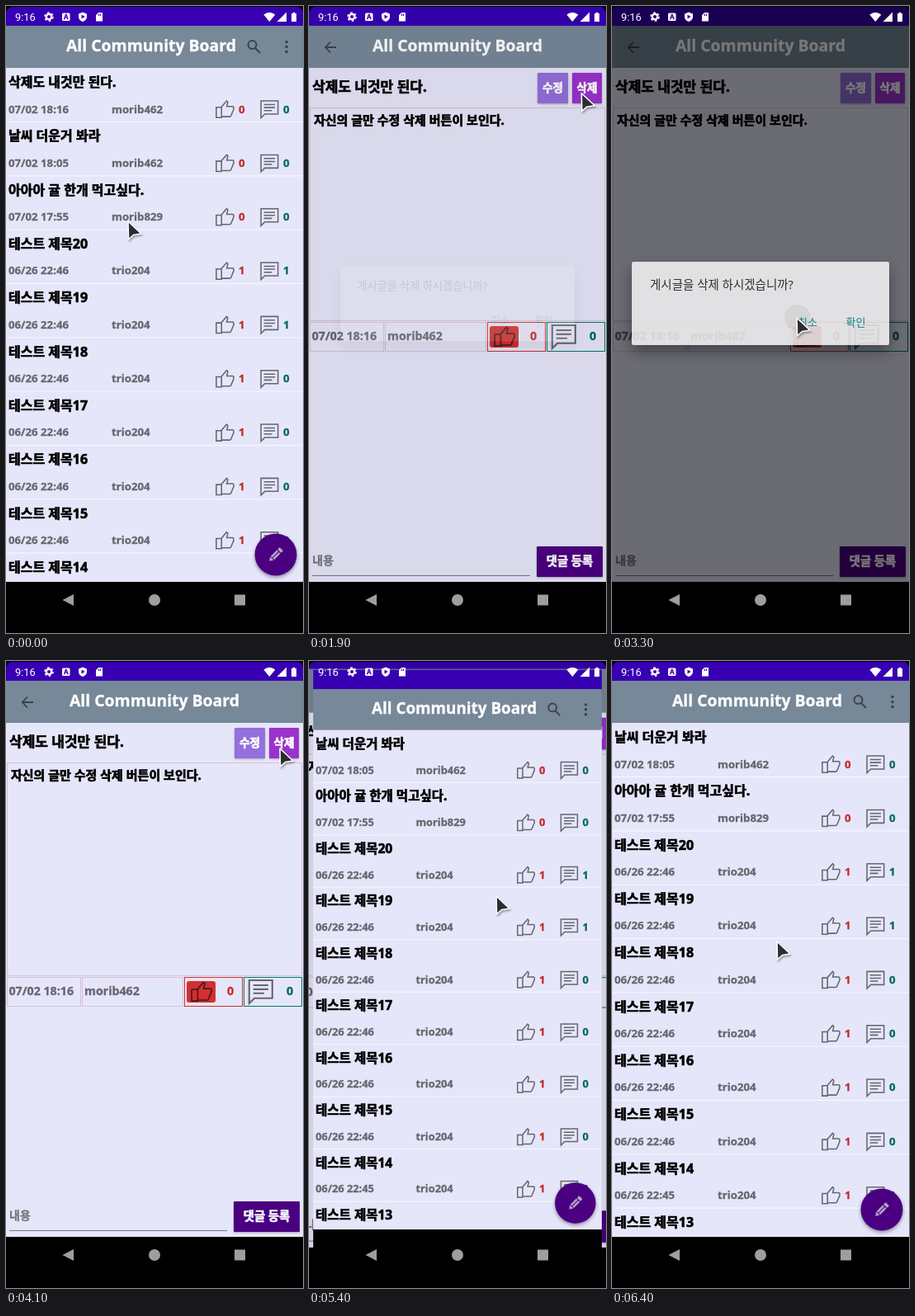
An HTML page for the animation above (6600 ms loop, 360 px wide and 760 px high).

```html
<!DOCTYPE html>
<html lang="ko">
<head>
<meta charset="utf-8">
<style>
  html, body { margin: 0; width: 100%; height: 100%; overflow: hidden; background: #000; }
  svg { display: block; width: 360px; height: 760px; clip-path: inset(1px 0 0 round 8px 8px 0 0); }
  text { font-family: 'Noto Sans', 'Noto Sans CJK KR', sans-serif; font-weight: 700; white-space: pre; stroke-width: .3; }
  .black { font-weight: 900; stroke-width: .65; }
  .plain { font-weight: 400; stroke-width: 0; }
  .mid { text-anchor: middle; }
  .icon { fill: none; stroke: #66666f; stroke-width: 1.5; }
  .raised { filter: drop-shadow(0 1px 1px #0004); }
  .fab { filter: drop-shadow(0 2px 2px #0006); }
  .card { filter: drop-shadow(0 8px 9px #0007); }
  #cursor { filter: drop-shadow(1px 2px 1px #0005); }
</style>
</head>
<body>
<svg viewBox="0 0 360 760" id="stage"></svg>
<script>
const rect = (x, y, w, h, fill, more = '') =>
  `<rect x="${x}" y="${y}" width="${w}" height="${h}" fill="${fill}" ${more}/>`;
const frame = (x, y, w, h, color) => rect(x + .5, y + .5, w - 1, h - 1, 'none', `stroke="${color}"`);
const text = (x, y, size, fill, str, cls = '') =>
  `<text x="${x}" y="${y}" font-size="${size}" fill="${fill}" stroke="${fill}" class="${cls}">${str}</text>`;
const icon = (d, x, y, k, more = '') =>
  `<path class="icon" d="${d}" transform="translate(${x} ${y}) scale(${k})" ${more}/>`;

const THUMB = 'M8 9.5L14 2.5L15.4 3.8L14.2 9H21Q22.3 9 22.3 10.3V12.3L19.3 19.6Q18.8 21 17.5 21H8zM8 10H1.8V22H8z';
const NOTE = 'M2 22.5V2.5H22V18H6.5zM5.5 6.8H18.5M5.5 10.3H18.5M5.5 13.8H15';
const RED = '#c62828', TEAL = '#00695c', GRAY = '#66666f', BG = '#e6e6fa';

// Posts, newest first
const posts = [
  ['삭제도 내것만 된다.', '07/02 18:16', 'morib462', 0, 0],
  ['날씨 더운거 봐라', '07/02 18:05', 'morib462', 0, 0],
  ['아아아 귤 한개 먹고싶다.', '07/02 17:55', 'morib829', 0, 0]
];
for (let n = 20; n > 12; n--)
  posts.push(['테스트 제목' + n, '06/26 22:4' + (n > 14 ? 6 : 5), 'trio204', 1, n > 18 ? 1 : 0]);

const screen = (titleX, body) =>
  rect(0, 74, 360, 625, BG) + body +
  rect(0, 0, 360, 25, '#3700b3') + rect(0, 24, 360, 51, '#778899') +
  text(titleX, 55, 19.4, '#fff', 'All Community Board', 'mid') +
  rect(0, 698, 360, 62, '#000');

const row = ([title, date, author, likes, notes], i) =>
  `<g transform="translate(0 ${75 + i * 65.33})">` +
  text(3, 23, 16, '#000', title, 'black') +
  text(3, 54.5, 13.2, GRAY, date) + text(128, 54.5, 13.2, GRAY, author) +
  icon(THUMB, 253, 37.5, 1.03) + text(282, 54.5, 13.2, RED, likes) +
  icon(NOTE, 307, 37.5, 1.03) + text(336, 54.5, 13.2, TEAL, notes) +
  rect(0, 65, 360, 1, '#f8f8ff') + '</g>';

const listScreen = items =>
  screen(176, items.slice(0, 10).map(row).join('')) +
  '<g fill="none" stroke="#3c4248" stroke-width="2"><circle cx="298.5" cy="47" r="5"/><path d="M302 51L308 57"/></g>' +
  [43.5, 49.5, 55.5].map(y => `<circle cx="340" cy="${y}" r="1.8" fill="#3c4248"/>`).join('') +
  '<circle class="fab" cx="327" cy="665" r="25.5" fill="#4b0082"/>' +
  '<g transform="translate(327 665) rotate(-45) scale(.95)" fill="#b5a3c6">' +
  '<path d="M-11.5 0L-7 -3.2V3.2z"/>' + rect(-6, -3.2, 11, 2.7, '#b5a3c6') +
  rect(-6, .5, 11, 2.7, '#b5a3c6') + rect(6.2, -3.2, 4, 6.4, '#b5a3c6', 'rx="1"') + '</g>';

const button = (x, y, w, color, label, size) =>
  rect(x, y, w, 37, color, 'class="raised" rx="1"') +
  text(x + w / 2, y + 22.7, size, '#fff', label, 'mid black');

const detailScreen = ([title, date, author, likes, notes]) =>
  screen(180,
    text(4, 104, 17, '#000', title, 'black') +
    button(277, 81, 37, '#9370db', '수정', 13.6) + button(319, 81, 36, '#9932cc', '삭제', 13.6) +
    frame(1, 123, 358, 259, '#d8bfd8') +
    text(6, 144, 15, '#000', '자신의 글만 수정 삭제 버튼이 보인다.', 'black') +
    frame(1, 383, 90, 36, '#d8bfd8') + frame(92, 383, 123, 36, '#d8bfd8') +
    text(3.5, 405, 14.2, GRAY, date) + text(95, 405, 14.2, GRAY, author) +
    frame(216, 383, 71, 36, '#d32f2f') + frame(288, 383, 71, 36, '#00796b') +
    rect(219, 388, 35, 26, '#d32f2f', 'rx="3"') +
    icon(THUMB, 223, 386.5, 1.17, 'style="stroke:#4a1c20"') + text(268, 405, 14.2, RED, likes) +
    icon(NOTE, 292, 383.5, 1.4) + text(340, 405, 14.2, TEAL, notes) +
    text(4, 677, 14, '#77777f', '내용') + rect(4, 690, 264, 1, '#77777f') +
    button(276, 655, 80, '#4b0082', '댓글 등록', 14.3)) +
  '<path d="M33 50H20M26 43.5L19.8 50L26 56.5" fill="none" stroke="#3c4248" stroke-width="1.8"/>';

const dialog =
  rect(24, 310, 312, 101, '#fff', 'rx="2" class="card"') +
  '<circle id="ripple" fill="#000"/>' +
  text(46, 342.5, 14.5, '#222', '게시글을 삭제 하시겠습니까?', 'plain') +
  text(225, 388, 13, '#018786', '취소', 'plain') + text(283.5, 388, 13, '#018786', '확인', 'plain');

const system =
  text(11, 18, 12.8, '#fff', '9:16', 'plain" style="font-family:Roboto,sans-serif') +
  '<g fill="none" stroke="#fff"><circle cx="52" cy="13" r="3.2" stroke-width="2.4"/>' +
  '<circle cx="52" cy="13" r="4.9" stroke-width="1.8" stroke-dasharray="2.6 2.53"/></g>' +
  rect(68, 8.5, 9.5, 9.5, '#fff', 'rx="1.5"') + text(72.7, 16.2, 8, '#3700b3', 'A', 'mid') +
  '<path fill="#fff" d="M93 7.5L98 9.5V13Q98 17 93 19Q88 17 88 13V9.5z"/>' +
  '<path fill="#3700b3" d="M91.5 10.5L95.7 13L91.5 15.5z"/>' +
  '<path fill="#fff" d="M112 8H117V18.5H109V11z"/>' +
  '<path stroke="#3700b3" d="M112.5 9.5V12M114.5 9.5V12"/>' +
  '<path fill="#fff" d="M312.3 10.5Q319.3 5 326.3 10.5L319.3 19zM328.5 19L340 7.5V19zM346 9H347.7V7.7H350.3V9H352V19H346z"/>' +
  '<g fill="#9e9e9e"><path d="M68.5 720L82 713V727z"/><circle cx="180" cy="720" r="7"/>' +
  rect(277, 713.5, 13, 13, '#9e9e9e') + '</g>';

const layer = (id, body) => `<g id="${id}">${body}</g>`;
const stage = document.getElementById('stage');
stage.innerHTML =
  layer('list', listScreen(posts)) + layer('detail', detailScreen(posts[0])) +
  rect(0, 0, 360, 698, '#000', 'id="dim"') + layer('dialog', dialog) +
  layer('shortList', listScreen(posts.slice(1))) + layer('system', system) +
  '<path id="cursor" d="M0 0L.5 22L6.5 16.5L16 15z" fill="#2c2c34" stroke="#fff" stroke-width="1.6" stroke-linejoin="round"/>';
const el = {};
stage.querySelectorAll('[id]').forEach(e => el[e.id] = e);

const clamp = v => Math.min(1, Math.max(0, v));
const ramp = (t, start, span) => clamp((t - start) / span);
const bezier = ([a, b, c, d], u) => {
  const v = 1 - u;
  return a * v * v * v + 3 * b * u * v * v + 3 * c * u * u * v + d * u * u * u;
};

// Fast start with a very long tail, in two joined curves
function ease(p) {
  const [xs, ys] = p < 1 / 6
    ? [[0, .05, .1333, 1 / 6], [0, 0, .06, .4]]
    : [[1 / 6, .2083, .25, 1], [.4, .82, 1, 1]];
  let lo = 0, hi = 1;
  for (let i = 0; i < 20; i++) {
    const mid = (lo + hi) / 2;
    if (bezier(xs, mid) < p) lo = mid; else hi = mid;
  }
  return bezier(ys, lo);
}

function place(e, opacity, scale = 1, cy = 380) {
  e.setAttribute('opacity', opacity);
  e.setAttribute('transform', `translate(180 ${cy}) scale(${scale}) translate(-180 ${-cy})`);
}

function swap(t, start, under, over) {
  const p = ramp(t, start, 400), e = ease(p);
  place(under, p < 1 ? 1 - .1 * e : 0, 1 + .05 * e);
  place(over, ramp(t, start + 35, 50), .85 + .15 * e);
}

// Dialog showings: appear, leave, click time and place
const showings = [
  { open: 1880, close: 3260, click: 3130, x: 225, y: 378 },
  { open: 4220, close: 4900, click: 4740, x: 295, y: 383 }
];

function drawDialog(t) {
  const s = showings[t < 3600 ? 0 : 1];
  const enter = ramp(t, s.open, 200);
  place(el.dialog, enter * (1 - ramp(t, s.close, 200)), .9 + .1 * ease(enter), 360);
  el.dim.setAttribute('opacity', .6 * enter * (1 - ramp(t, s.close + 20, 180)));
  const r = ramp(t, s.click, 170);
  el.ripple.setAttribute('cx', s.x);
  el.ripple.setAttribute('cy', s.y);
  el.ripple.setAttribute('r', 16 * r);
  el.ripple.setAttribute('opacity', .06 * (r > 0));
}

// Pointer stops: time, x, y
const path = [
  [0, 148, 261], [500, 160, 112], [700, 160, 112], [1000, 211, 219], [1600, 334, 102],
  [1850, 334, 102], [2200, 267, 169], [3000, 224, 378], [3300, 224, 378], [4000, 332, 106],
  [4200, 332, 106], [4700, 294, 381], [5200, 294, 381], [5400, 227, 285], [6400, 200, 340], [6600, 200, 340]
];

function drawCursor(t) {
  const i = path.findIndex(p => p[0] > t);
  const [t0, x0, y0] = path[i - 1], [t1, x1, y1] = path[i];
  const p = (t - t0) / (t1 - t0), k = p * p * (3 - 2 * p);
  el.cursor.setAttribute('transform', `translate(${x0 + (x1 - x0) * k} ${y0 + (y1 - y0) * k})`);
}

function draw(now) {
  const t = Math.floor(now % 6600 / 100) * 100;
  if (t < 3000) {
    swap(t, 700, el.list, el.detail);
    place(el.shortList, 0);
  } else {
    place(el.list, 0);
    swap(t, 5290, el.detail, el.shortList);
  }
  drawDialog(t);
  drawCursor(t);
}

const begin = performance.now();
function tick() {
  draw(performance.now() - begin);
  requestAnimationFrame(tick);
}
tick();
</script>
</body>
</html>
```
